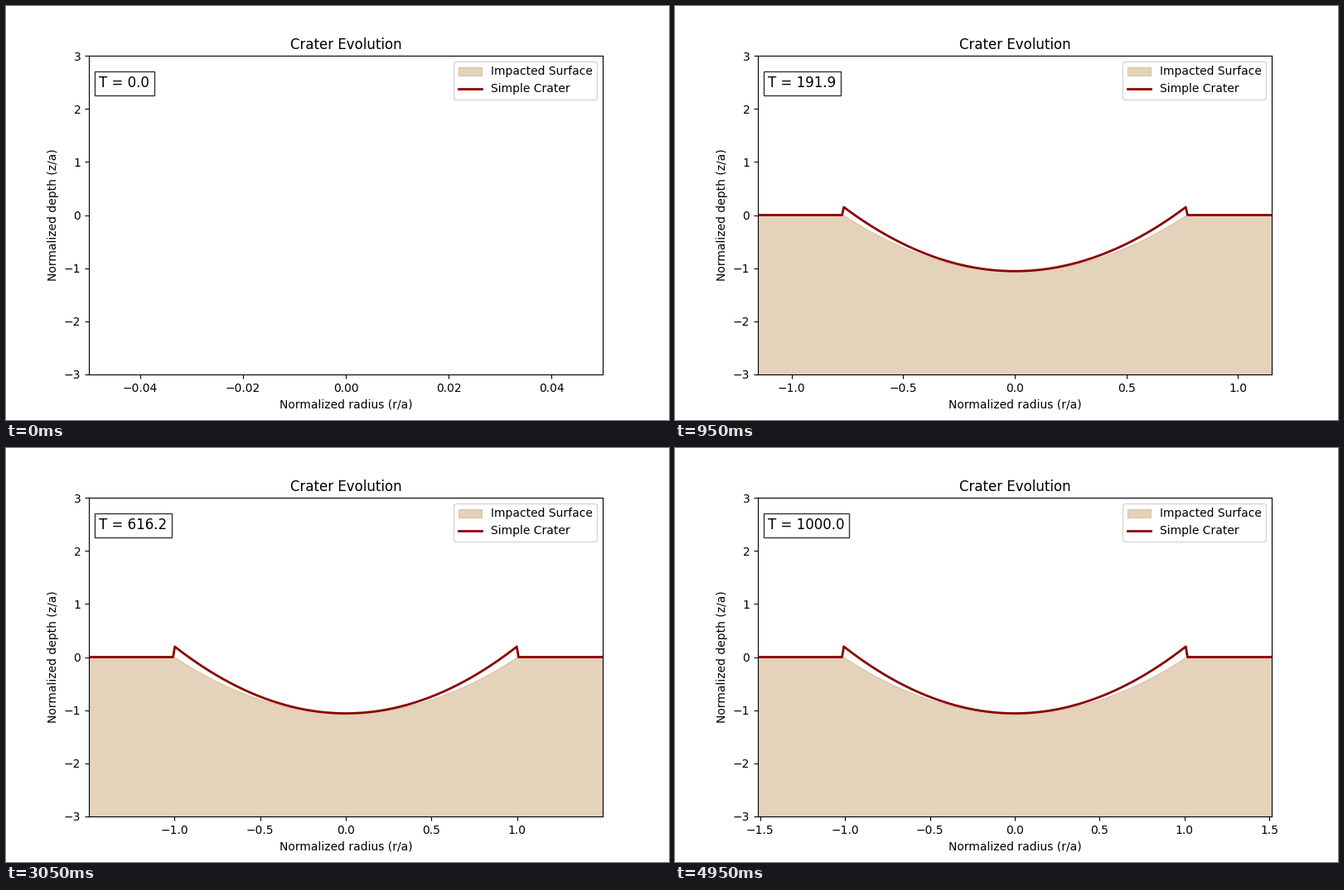
A matplotlib script for the animation above (5000 ms loop, 800 px wide and 500 px high).

```python
import numpy as np
import matplotlib.pyplot as plt
from matplotlib.animation import FuncAnimation

FRAMES = 100
INTERVAL = 50
T_END = 1000.0

R_MAX, R_TAU = 1.0095, 134.4      # crater radius growth
D_MAX, D_TAU = 1.06, 35.0         # crater depth growth
RIM_RATIO = 0.2                   # rim height relative to radius
FLOOR = -3

u = np.linspace(-1.5, 1.5, 300)   # radius in units of the crater radius
inside = np.abs(u) <= 1


def grow(limit, tau, t):
    return limit * (1 - np.exp(-t / tau))


def profiles(t):
    """Return x, the excavated surface and the crater outline with its rim."""
    radius = grow(R_MAX, R_TAU, t)
    depth = grow(D_MAX, D_TAU, t)
    surface = np.where(inside, -depth * (1 - u**2), 0)
    outline = surface + np.where(inside, RIM_RATIO * radius * u**2, 0)
    return u * radius, surface, outline


fig, ax = plt.subplots(figsize=(8, 5), dpi=100)
ax.set_title("Crater Evolution")
ax.set_xlabel("Normalized radius (r/a)")
ax.set_ylabel("Normalized depth (z/a)")
ax.set_ylim(FLOOR, 3)

ground = ax.fill_between(u, FLOOR, 0, color="tan", alpha=0.6,
                         label="Impacted Surface")
crater, = ax.plot([], [], color="darkred", lw=2, label="Simple Crater")
clock = ax.text(0.02, 0.9, "", transform=ax.transAxes, fontsize=12,
                bbox=dict(facecolor="white", alpha=0.8))
ax.legend(loc="upper right")


def update(i):
    t = T_END * i / (FRAMES - 1)
    clock.set_text(f"T = {t:.1f}")
    if i == 0:
        ax.set_xlim(-0.05, 0.05)
        ground.set_verts([])
        crater.set_data([], [])
    else:
        x, surface, outline = profiles(t)
        ax.set_xlim(x[0], x[-1])
        top = np.column_stack([x, surface])
        ground.set_verts([np.vstack([[x[0], FLOOR], top, [x[-1], FLOOR]])])
        crater.set_data(x, outline)
    return ground, crater, clock


anim = FuncAnimation(fig, update, frames=FRAMES, interval=INTERVAL,
                     init_func=lambda: update(0), repeat=True, repeat_delay=0)
plt.show()
```
